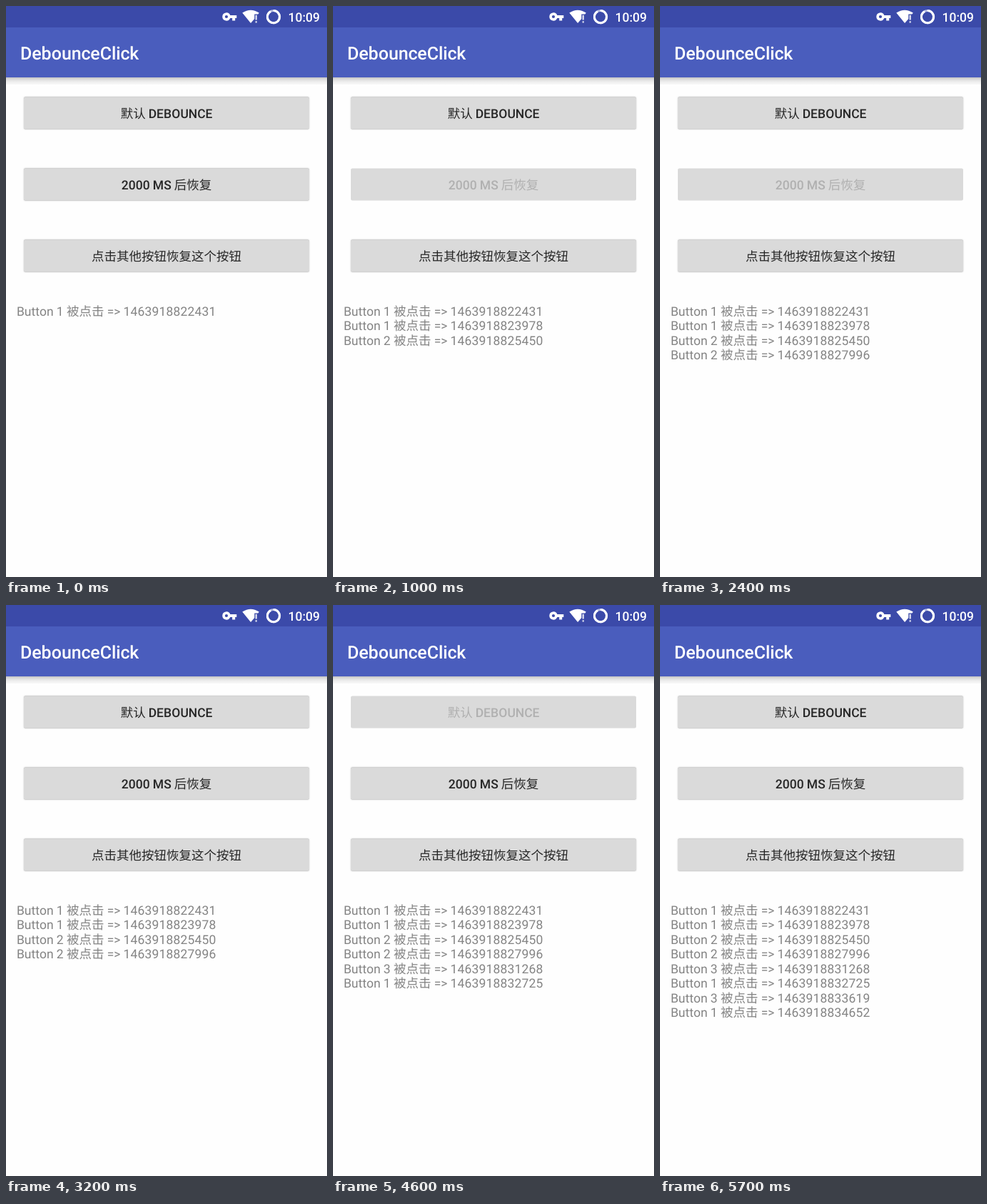
An HTML page that plays this animation: 450 px wide and 800 px high, repeating every 6 s.

```html
<!DOCTYPE html>
<html lang="zh-CN">
<head>
<meta charset="utf-8">
<title>DebounceClick</title>
<style>
html, body { margin: 0; width: 100%; height: 100%; overflow: hidden; background: #fefefe; }
svg { position: absolute; left: 0; top: 0; width: 450px; height: 800px; }
text { text-rendering: geometricPrecision; white-space: pre; }
.cjk { font-weight: 400; }
.light { fill: #fff; }
.label { fill: #262626; }
.label.off { fill: #b0b0b0; }
.log { fill: #848484; }
.plate { fill: #dadada; filter: drop-shadow(0 0 .7px rgba(0,0,0,.26)) drop-shadow(0 .8px .8px rgba(0,0,0,.2)); }
.plate.off { filter: none; }
.bar { position: absolute; left: 0; top: 0; width: 450px; height: 100px; background: linear-gradient(#3b4aa9 30px, #4a5dbd 30px); }
.shade { position: absolute; left: 0; top: 100px; width: 450px; height: 10px;
  background: linear-gradient(#c4c4c4, #dedede 30%, #efefef 65%, #f8f8f8); }
</style>
</head>
<body>
<div class="shade"></div>
<div class="bar"></div>
<svg viewBox="0 0 450 800">
  <g id="plates"></g>
  <g fill="#fff">
    <path fill-rule="evenodd" d="M303.3 15a5.7 5.7 0 0 1 11-2H323.3V17H321.2V20.4H317.2V17H314.3a5.7 5.7 0 0 1-11-2ZM306.9 15a2.1 2.1 0 0 0 4.2 0a2.1 2.1 0 0 0-4.2 0Z"/>
    <path d="M331.3 9.6Q343 1.8 354.8 9.6L353.4 11.4H348.3V18L343.1 24Z"/>
    <path fill-opacity=".85" d="M349.6 12.8H351.8V19.6H349.6ZM349.6 21.2H351.8V23.6H349.6Z"/>
  </g>
  <g fill="none" stroke="#fff" stroke-width="3">
    <circle cx="375" cy="15.2" r="8.6" stroke-opacity=".65"/>
    <path d="M375 6.6A8.6 8.6 0 1 1 371 7.6"/>
  </g>
  <g id="texts"></g>
</svg>
<script>
const LOOP = 6000;
const SCALE = 2.4; // device pixels per stage pixel
const FAMILY = 'Roboto, "Noto Sans CJK SC", "Noto Sans CJK", sans-serif';
const HAN = /[\u4e00-\u9fff]/;

// label and the spans of time in which the button is disabled
const buttons = [
  ['默认 DEBOUNCE', [[200, 400], [4600, 4800], [5500, 5700]]],
  ['2000 MS 后恢复', [[900, 2000], [2200, 3200]]],
  ['点击其他按钮恢复这个按钮', [[3800, 4600], [5000, 5500]]]
];

// time of click, button, last digits of the stamp
const clicks = [
  [0, 1, 22431], [200, 1, 23978], [900, 2, 25450], [2200, 2, 27996],
  [3800, 3, 31268], [4600, 1, 32725], [5000, 3, 33619], [5500, 1, 34652]
];

const ctx = document.createElement('canvas').getContext('2d');

function addShape(parent, tag, attrs) {
  const el = document.createElementNS('http://www.w3.org/2000/svg', tag);
  for (const key in attrs) el.setAttribute(key, attrs[key]);
  return document.getElementById(parent).appendChild(el);
}

// glyph advances are whole device pixels, as on the phone
function advance(ch, size, weight) {
  ctx.font = `${HAN.test(ch) ? 400 : weight} ${size * SCALE}px ${FAMILY}`;
  return Math.round(ctx.measureText(ch).width) / SCALE;
}

function addText(cls, str, x, y, { size = 17.5, weight = 500, centered = false } = {}) {
  const steps = [...str].map(ch => advance(ch, size, weight));
  let pen = centered ? x - steps.reduce((a, b) => a + b) / 2 : x;
  const xs = steps.map(w => (pen += w) - w);
  const el = addShape('texts', 'text', { class: cls, x: xs.map(v => v.toFixed(2)).join(' '), y });
  el.style.font = `${weight} ${size}px ${FAMILY}`;
  el.innerHTML = str.replace(/[\u4e00-\u9fff]+/g, '<tspan class="cjk">$&</tspan>');
  return el;
}

addText('light', '10:09', 395.5, 22);
addText('light', 'DebounceClick', 20, 75, { size: 25 });

const views = buttons.map(([label, offs], i) => ({
  offs,
  parts: [
    addShape('plates', 'rect', { class: 'plate', x: 25, y: 127.5 + 100 * i, width: 400, height: 45, rx: 2 }),
    addText('label', label, 225, 156.5 + 100 * i, { centered: true })
  ]
}));

const lines = clicks.map(([at, n, stamp], i) => ({
  at,
  el: addText('log', `Button ${n} 被点击 => 14639188${stamp}`, 15, 434 + i * 49 / SCALE, { weight: 400 })
}));

function draw(t) {
  for (const { offs, parts } of views) {
    const off = offs.some(([a, b]) => t >= a && t < b);
    parts.forEach(p => p.classList.toggle('off', off));
  }
  for (const { at, el } of lines) el.style.visibility = t >= at ? 'visible' : 'hidden';
}

const start = performance.now();
function tick() {
  draw((performance.now() - start) % LOOP);
  requestAnimationFrame(tick);
}
tick();
</script>
</body>
</html>
```
